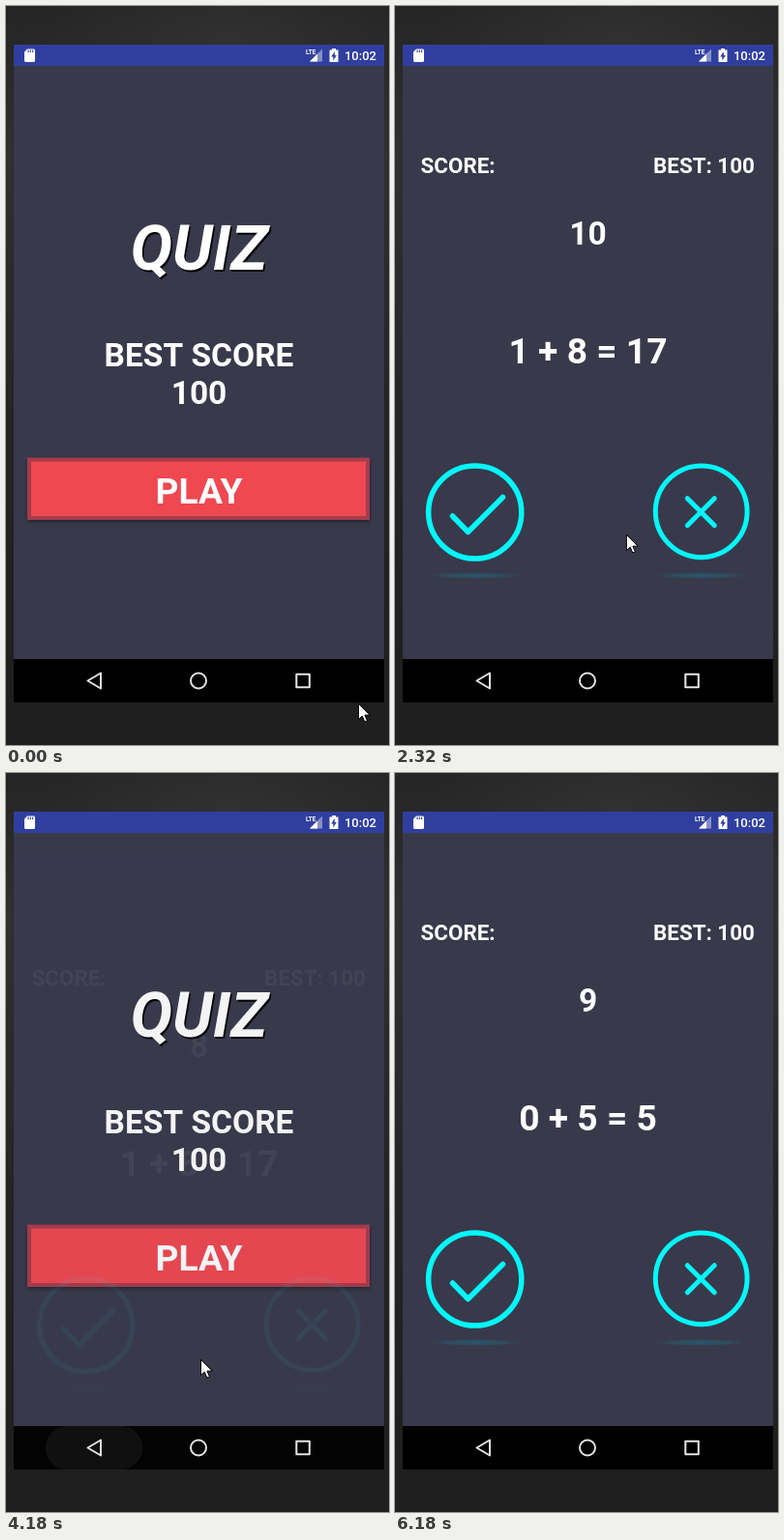
Recreate the animation shown at these times as an HTML page with a canvas. Size 396 px wide and 765 px high, loop 6.8 s.

```html
<!DOCTYPE html>
<html lang="en">
<head>
<meta charset="utf-8">
<title>Quiz</title>
<style>
  html, body { margin: 0; width: 100%; height: 100%; overflow: hidden; background: #222; }
  canvas { display: block; }
</style>
</head>
<body>
<canvas id="stage" width="396" height="765"></canvas>
<script>
const ctx = document.getElementById('stage').getContext('2d');
const LOOP = 6800;
const TICK = 77.25;
const MID = 199.5;
const PHONE = { x: 8, y: 40, w: 383, h: 681 };
const SLIDE = PHONE.h * 0.08;
const CYAN = '#02f8f8';
const BLUE = '#303f9f';

const ROUNDS = [
  { start: 1660, sum: '1 + 8 = 17', close: 3930 },
  { start: 4887, sum: '0 + 5 = 5', close: Infinity }
];
const COUNT_PERIOD = 960;
const CLOSE_TIME = 250;
const PRESS = { from: 3800, to: 4260, ramp: 170 };

// Each stroke of the hand eases from wherever the pointer rests
const POINTER_START = { x: 364, y: 722 };
const POINTER_GONE = 6180;
const STROKES = [
  { from: 0, to: 154, x: 287, y: 437 },
  { from: 230, to: 385, x: 315, y: 404 },
  { from: 385, to: 930, x: 278, y: 509 },
  { from: 2130, to: 2780, x: 84, y: 698 },
  { from: 3020, to: 3170, x: 94, y: 697 },
  { from: 3828, to: 4260, x: 214, y: 596 },
  { from: 4480, to: 4860, x: 239, y: 502 },
  { from: 4950, to: 5870, x: 97, y: 722 },
  { from: 5880, to: 6105, x: 234, y: 733 }
];

const clamp = v => Math.min(1, Math.max(0, v));
const smooth = u => u * u * (3 - 2 * u);

function pointerAt(t) {
  return STROKES.reduce((p, s) => {
    const k = smooth(clamp((t - s.from) / (s.to - s.from)));
    return { x: p.x + (s.x - p.x) * k, y: p.y + (s.y - p.y) * k };
  }, POINTER_START);
}

function rect(color, x, y, w, h) {
  ctx.fillStyle = color;
  ctx.fillRect(x, y, w, h);
}

function text(str, x, y, size, { align = 'center', color = '#fff', style = 'bold' } = {}) {
  ctx.font = `${style} ${size}px Roboto, sans-serif`;
  ctx.textAlign = align;
  ctx.fillStyle = color;
  ctx.fillText(str, x, y);
}

function pen(color, width) {
  ctx.strokeStyle = color;
  ctx.lineWidth = width;
  ctx.lineCap = ctx.lineJoin = 'round';
}

// Paths are SVG path strings
const fill = (color, d) => { ctx.fillStyle = color; ctx.fill(new Path2D(d)); };
const line = d => ctx.stroke(new Path2D(d));

function ring(x, y, r) {
  ctx.beginPath();
  ctx.arc(x, y, r, 0, Math.PI * 2);
  ctx.stroke();
}

function backdrop() {
  const base = ctx.createLinearGradient(0, 0, 0, 765);
  base.addColorStop(0, '#252525');
  base.addColorStop(0.2, '#303030');
  base.addColorStop(0.55, '#252525');
  base.addColorStop(1, '#1e1e1e');
  rect(base, 0, 0, 396, 765);
  const sheen = ctx.createRadialGradient(230, 40, 0, 230, 40, 200);
  sheen.addColorStop(0, 'rgba(255,255,255,.045)');
  sheen.addColorStop(1, 'rgba(255,255,255,0)');
  rect(sheen, 0, 0, 396, 240);
}

function windowBase() {
  rect('#39394c', PHONE.x, 40, PHONE.w, 636);
  rect(BLUE, PHONE.x, 40, PHONE.w, 22);
  rect('#000', PHONE.x, 676, PHONE.w, 45);
}

function home(faded) {
  windowBase();
  const color = faded ? '#000' : '#fff';
  const title = { color, style: 'italic bold' };
  if (faded) rect('rgba(0,0,0,.14)', PHONE.x, 40, PHONE.w, 22);
  else text('QUIZ', MID + 1.5, 274.5, 65.2, { ...title, color: '#000' });
  text('QUIZ', MID, 273, 65.2, title);
  text('BEST SCORE', MID, 373, 33.5, { color });
  text('100', MID, 412, 33.5, { color });

  ctx.save();
  if (!faded) {
    ctx.shadowColor = 'rgba(0,0,0,.4)';
    ctx.shadowBlur = 4;
    ctx.shadowOffsetY = 2;
  }
  rect(faded ? '#6b2f45' : '#a53c4b', 22, 467.5, 354, 64.5);
  ctx.restore();
  rect(faded ? '#6b2f45' : '#ef4851', 26, 471.5, 346, 56.5);
  text('PLAY', MID, 515, 37.2, { color: faded ? '#888' : '#fff' });
}

function glow(x, y) {
  ctx.save();
  ctx.translate(x, y);
  ctx.scale(1, 0.07);
  const g = ctx.createRadialGradient(0, 0, 0, 0, 0, 48);
  g.addColorStop(0, 'rgba(35,100,118,.7)');
  g.addColorStop(0.6, 'rgba(35,100,118,.45)');
  g.addColorStop(1, 'rgba(35,100,118,0)');
  rect(g, -48, -48, 96, 96);
  ctx.restore();
}

function game({ sum, count, offset, alpha, veil }) {
  ctx.save();
  ctx.translate(0, offset);
  ctx.globalAlpha = veil;
  windowBase();
  ctx.globalAlpha = alpha;
  text('SCORE:', 26.6, 173, 22.35, { align: 'left' });
  text('BEST: 100', 371.8, 173, 22.35, { align: 'right' });
  text(count, MID, 247, 33.5);
  text(sum, MID, 370, 37.2);

  pen(CYAN, 5.5);
  ring(82.7, 524, 48.1);
  line('M59.5 528 L75.5 544.5 L111.5 508.5');
  pen(CYAN, 5);
  ring(316.7, 523.3, 47.4);
  line('M302.3 509.7 l28 28 m0 -28 l-28 28');
  glow(83, 589.5);
  glow(316.5, 589.5);
  ctx.restore();
}

function statusIcons() {
  fill('#fff', 'M22 44.5 H29 L30 45.5 V57 L29 58 H20 L19 57 V47.5 Z');
  for (let i = 0; i < 3; i++) rect(BLUE, 22.5 + i * 2.3, 45.5, 1.1, 2.6);

  fill('#8790c6', 'M327 44.5 V57.5 H314 Z');
  fill('#fff', 'M322 49.5 V57.5 H314 Z');
  rect(BLUE, 309.5, 43.5, 11, 7);
  text('LTE', 310, 50, 6.4, { align: 'left' });

  rect('#fff', 337, 44, 4, 2);
  rect('#fff', 334.5, 45.5, 9, 12.5);
  fill(BLUE, 'M339.8 47 L336.2 52.6 H338.3 V56.6 L341.8 51 H339.8 Z');

  text('10:02', 383, 56, 13.03, { align: 'right', style: '500' });
}

function navIcons(press) {
  ctx.globalAlpha = press;
  ctx.beginPath();
  ctx.roundRect(41, 676, 100, 45, 22);
  ctx.fillStyle = '#1d1d1d';
  ctx.fill();
  ctx.globalAlpha = 1;

  pen('#e4e4e4', 2);
  line('M84.5 698.5 L98 690.5 V706.5 Z');
  ring(199, 698.5, 8);
  ctx.strokeRect(300.3, 691.7, 13.5, 13.5);
}

function pointer({ x, y }) {
  ctx.save();
  ctx.translate(x + 0.5, y + 0.5);
  const arrow = 'M0 0 V16 L3.8 12.6 L6.4 18.5 L9 17.4 L6.5 11.6 H11.5 Z';
  pen('#000', 1);
  fill('#fff', arrow);
  line(arrow);
  ctx.restore();
}

function roundState({ start, sum, close }, t) {
  const age = t - start;
  const leaving = Math.max(0, t - close);
  const faded = age > 90 && age < 180;
  const opening = 1 - (1 - clamp(age / 200)) ** 4;
  const closing = clamp(1 - (leaving - 100) / 150);
  return {
    sum, faded,
    count: 10 - Math.floor(age / COUNT_PERIOD),
    offset: SLIDE * ((1 - clamp(age / 350)) ** 5 + clamp(leaving / CLOSE_TIME) ** 4),
    alpha: faded ? 1 : opening * closing,
    veil: faded ? 0.94 : opening * closing
  };
}

function draw(time) {
  const t = Math.floor(time / TICK) * TICK;
  const round = ROUNDS.find(r => t >= r.start && t < r.close + CLOSE_TIME);
  const state = round && roundState(round, t);
  backdrop();

  ctx.save();
  ctx.beginPath();
  ctx.rect(PHONE.x, PHONE.y, PHONE.w, PHONE.h);
  ctx.clip();
  home(state && state.faded);
  if (state) game(state);
  statusIcons();
  navIcons(clamp(Math.min(t - PRESS.from, PRESS.to - t) / PRESS.ramp));
  ctx.restore();

  if (t < POINTER_GONE) pointer(pointerAt(t));
}

function loop() {
  draw(performance.now() % LOOP);
  requestAnimationFrame(loop);
}
loop();
</script>
</body>
</html>
```
